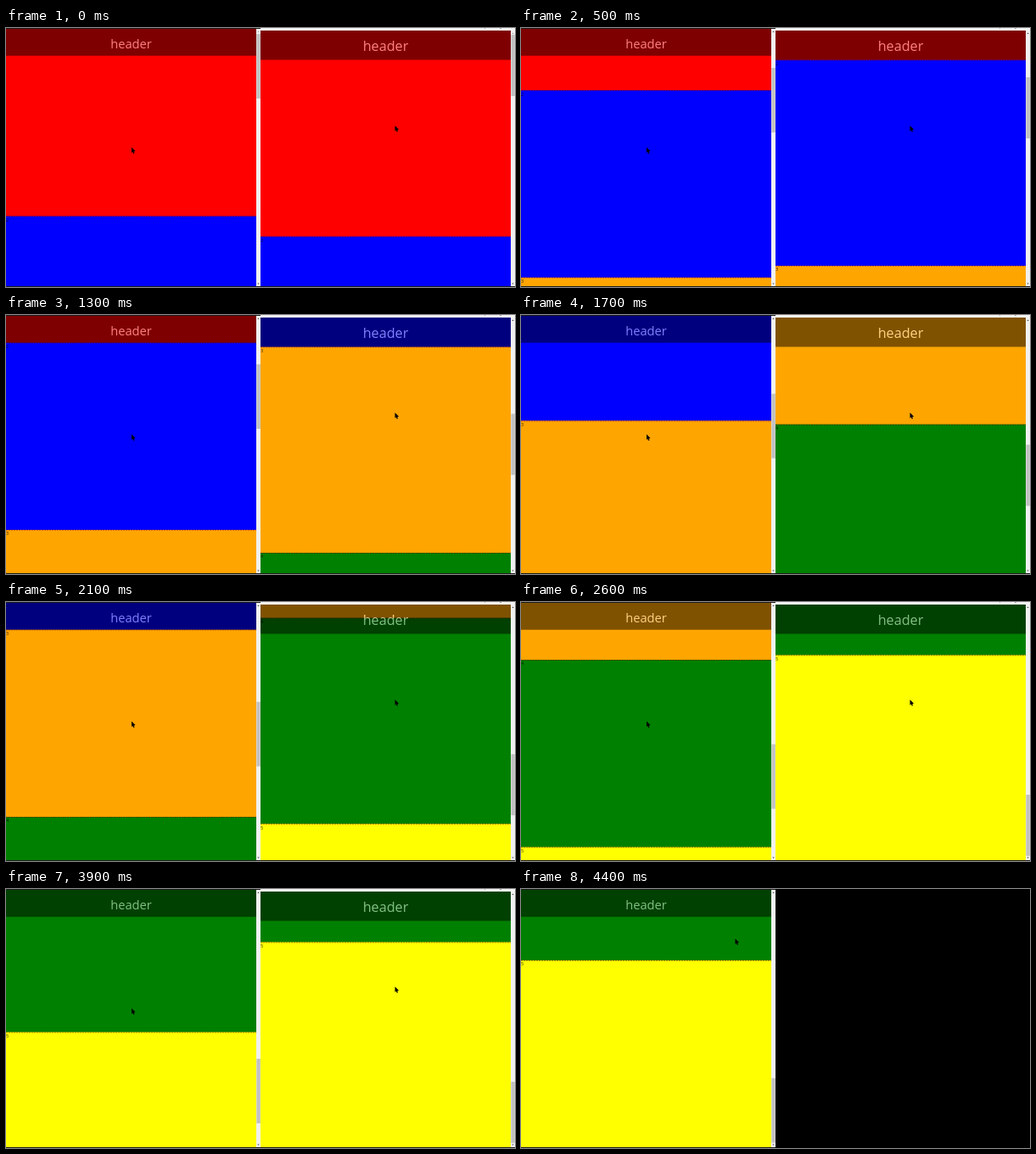
An HTML page with a canvas for the animation above (4500 ms loop, 600 by 305 pixels).

```html
<!DOCTYPE html>
<html lang="en">
<head>
<meta charset="utf-8">
<title>Scroll snapping side by side</title>
<style>
  html, body { margin: 0; width: 100%; height: 100%; overflow: hidden; background: #000; }
  canvas { display: block; }
</style>
</head>
<body>
<canvas id="stage" width="600" height="305"></canvas>
<script>
const ctx = document.getElementById('stage').getContext('2d');
const LOOP = 4500, STEP = 100, BOTTOM = 304;
const COLORS = ['#f00', '#00f', '#ffa500', '#008000', '#ff0'];

// Each move: start time, end time, scroll position reached.
const left = {
  x: 0, top: 1, section: 220.5, header: 31.7, fontSize: 14.7, baseline: 23.8,
  thumbTop: 7, thumbRate: 0.27, thumbHeight: 76, arrowTop: 3,
  moves: [[150, 650, 189], [1350, 1980, 409.5], [2190, 2740, 630], [3550, 4250, 799]]
};
const right = {
  x: 300, top: 3, section: 242.5, header: 34.5, fontSize: 16.2, baseline: 27,
  thumbTop: 8, thumbRate: 0.2405, thumbHeight: 72, arrowTop: 5,
  moves: [[130, 500, 208], [700, 1280, 450.5], [1350, 1950, 693], [1995, 2575, 910.5]]
};

const progress = (t, start, end) => Math.min(1, Math.max(0, (t - start) / (end - start)));
const easeInOut = p => p * p * (3 - 2 * p);

function scrollAt(moves, t) {
  let scroll = 0;
  for (const [start, end, goal] of moves) {
    scroll += (goal - scroll) * easeInOut(progress(t, start, end));
  }
  return scroll;
}

function rect(color, x, y, w, h) {
  ctx.fillStyle = color;
  ctx.fillRect(x, y, w, h);
}

function polygon(color, points) {
  ctx.fillStyle = color;
  ctx.beginPath();
  points.forEach(([x, y]) => ctx.lineTo(x, y));
  ctx.fill();
}

function drawSections(pane, scroll) {
  COLORS.forEach((color, i) => {
    const y = pane.top + i * pane.section - scroll;
    rect(color, pane.x, y, 295, pane.section + 0.5);
    if (i === 0) return;
    ctx.strokeStyle = 'rgba(150, 0, 0, 0.6)';
    ctx.lineWidth = 0.8;
    ctx.setLineDash([2, 1]);
    ctx.beginPath();
    ctx.moveTo(pane.x, y + 0.4);
    ctx.lineTo(pane.x + 295, y + 0.4);
    ctx.stroke();
    ctx.fillStyle = 'rgba(0, 0, 0, 0.8)';
    ctx.font = '5.5px "Open Sans", sans-serif';
    ctx.textAlign = 'left';
    ctx.fillText(i + 1, pane.x, y + 6.4);
  });
}

function drawHeader(pane) {
  rect('rgba(0, 0, 0, 0.5)', pane.x, pane.top, 295, pane.header);
  // Adding grey equals white text at half opacity.
  ctx.globalCompositeOperation = 'lighter';
  ctx.fillStyle = '#808080';
  ctx.font = `${pane.fontSize}px "Open Sans", sans-serif`;
  ctx.textAlign = 'center';
  ctx.fillText('header', pane.x + 147.5, pane.baseline);
  ctx.globalCompositeOperation = 'source-over';
}

function drawScrollbar(pane, scroll) {
  const x = pane.x + 295, up = pane.arrowTop;
  rect('#f1f1f1', x, pane.top, 5, BOTTOM - pane.top);
  rect('#c1c1c1', x + 0.4, pane.thumbTop + pane.thumbRate * scroll, 4.4, pane.thumbHeight);
  polygon(scroll > 0 ? '#505050' : '#a3a3a3', [[x + 1.3, up + 2], [x + 2.5, up + 0.5], [x + 3.7, up + 2]]);
  polygon('#505050', [[x + 1.3, 300.5], [x + 2.5, 302], [x + 3.7, 300.5]]);
}

function drawCursor(x, y) {
  polygon('#000', [[0, 0], [0, 6.4], [1.4, 5.3], [2.3, 7.4], [3.5, 6.9], [2.7, 4.9], [4.6, 4.6]]
    .map(([dx, dy]) => [x + dx, y + dy]));
}

function drawPane(pane, t) {
  const scroll = scrollAt(pane.moves, t);
  ctx.save();
  ctx.beginPath();
  ctx.rect(pane.x, pane.top, 300, BOTTOM - pane.top);
  ctx.clip();
  drawSections(pane, scroll);
  drawHeader(pane);
  drawScrollbar(pane, scroll);
  ctx.restore();
}

function draw(time) {
  const clock = Math.floor((time % LOOP) / STEP) * STEP;
  const t = clock < 200 ? 0 : clock;
  rect('#000', 0, 0, 600, 305);
  rect('#1c1c1c', 0, 0, 300, 1);
  rect('#1c1c1c', 0, BOTTOM, 300, 1);
  drawPane(left, t);
  const travel = easeInOut(progress(t, 4000, 4400));
  drawCursor(148 + 104.5 * travel, 140.5 - 82 * travel);

  if (t < 4000) {
    rect('#f4f4f4', 300, 0, 300, 3);
    rect('#aaa', 564, 0, 1, 1);
    rect('#aaa', 582, 0, 2, 1);
    rect('#1c1c1c', 300, BOTTOM, 300, 1);
    drawPane(right, t);
    drawCursor(458.5, 115);
  }
}

function tick() {
  draw(performance.now());
  requestAnimationFrame(tick);
}
tick();
</script>
</body>
</html>
```
